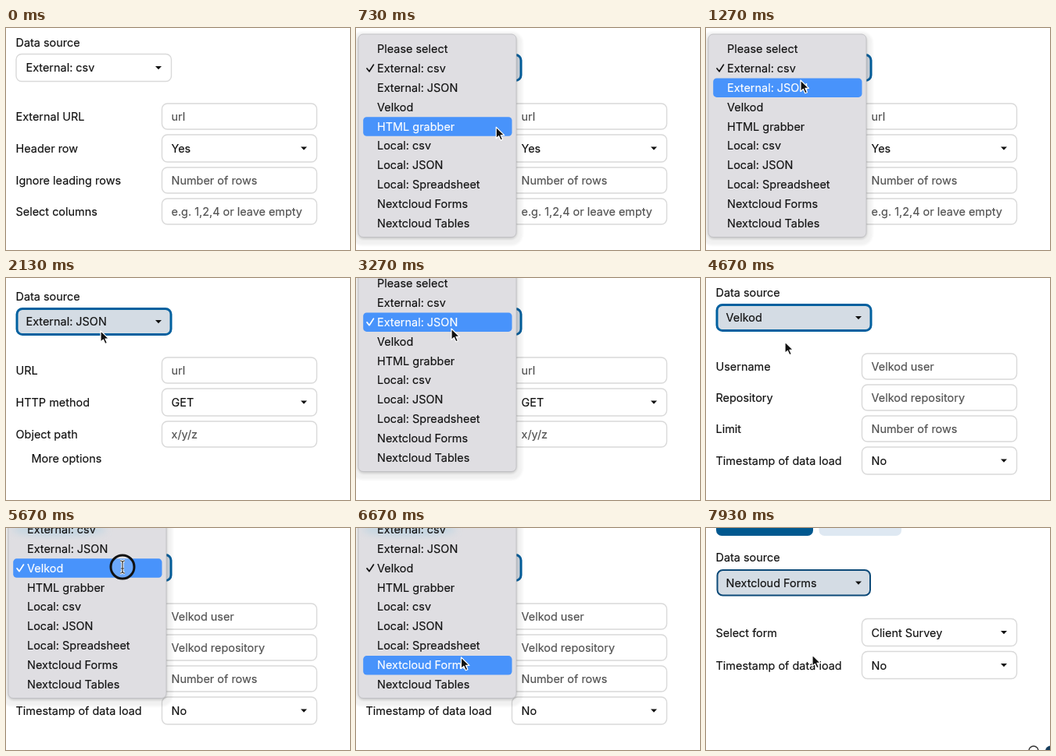
These frames come from a looping animation (440x285 px, 8000 ms). An HTML page:

```html
<!DOCTYPE html>
<html lang="en">
<head>
<meta charset="utf-8">
<title>Data source picker</title>
<style>
  html, body { margin: 0; width: 100%; height: 100%; overflow: hidden; background: #fff; }
  svg { display: block; width: 440px; height: 285px; }
  text { font: 14.45px Inter, "Open Sans", sans-serif; fill: #111; stroke: #111; stroke-width: 0.15; }
  .hint { fill: #505050; stroke: #505050; }
  .lit { fill: #fff; stroke: #fff; }
  .box { fill: #fff; stroke: #d9d9d9; stroke-width: 1.4; }
</style>
</head>
<body>
<svg id="stage" viewBox="0 0 440 285">
  <defs>
    <filter id="soft" x="-20%" y="-20%" width="140%" height="140%"><feGaussianBlur stdDeviation="5"/></filter>
    <filter id="crisp" x="-20%" y="-20%" width="140%" height="140%"><feGaussianBlur stdDeviation="1.5"/></filter>
  </defs>
</svg>
<script>
const LOOP = 8000;
const stage = document.getElementById('stage');

function add(parent, tag, attrs = {}, content) {
  const el = document.createElementNS('http://www.w3.org/2000/svg', tag);
  for (const key in attrs) el.setAttribute(key, attrs[key]);
  if (content) el.textContent = content;
  parent.append(el);
  return el;
}
const set = (el, attrs) => { for (const key in attrs) el.setAttribute(key, attrs[key]); };
const show = (el, on) => el.setAttribute('visibility', on ? 'visible' : 'hidden');
const clamp = v => Math.max(0, Math.min(1, v));
const smooth = v => v * v * (3 - 2 * v);
const label = (g, x, mid, s, cls = '') => add(g, 'text', { x, y: mid + 5.2, class: cls }, s);
const caret = (g, x, y) => add(g, 'path', { d: `M${x - 4} ${y - 2}h8l-4 4.2z`, fill: '#111' });

// Each row: label, content, isSelect
const forms = [
  { from: 0, top: 0, source: 'External: csv', rows: [
    ['External URL', 'url'], ['Header row', 'Yes', true],
    ['Ignore leading rows', 'Number of rows'], ['Select columns', 'e.g. 1,2,4 or leave empty']] },
  { from: 1870, top: 5, source: 'External: JSON', extra: 'More options', rows: [
    ['URL', 'url'], ['HTTP method', 'GET', true], ['Object path', 'x/y/z']] },
  { from: 4230, top: 0, source: 'Velkod', rows: [
    ['Username', 'Velkod user'], ['Repository', 'Velkod repository'],
    ['Limit', 'Number of rows'], ['Timestamp of data load', 'No', true]] },
  { from: 7270, top: 19.5, source: 'Nextcloud Forms', rows: [
    ['Select form', 'Client Survey', true], ['Timestamp of data load', 'No', true]] }
];

function buildForm({ top, source, rows, extra }) {
  const g = add(stage, 'g');
  label(g, 12.5, top + 18.5, 'Data source');
  const picker = add(g, 'rect', { x: 13, y: top + 33.5, width: 198.5, height: 35, rx: 7, class: 'box' });
  label(g, 25.5, top + 51, source);
  caret(g, 195, top + 51);
  let y = top + 97;
  for (const [name, value, isSelect] of rows) {
    const height = isSelect ? 35 : 33, mid = y + height / 2;
    label(g, 12.5, mid + 0.5, name);
    add(g, 'rect', { x: 199.5, y, width: 198, height, rx: 7, class: 'box' });
    label(g, 211.5, mid + 0.5, value, isSelect ? '' : 'hint');
    if (isSelect) caret(g, 381, mid);
    y += height + 7;
  }
  if (extra) label(g, 32.5, y + 8, extra);
  return { g, picker, top };
}
const views = forms.map(buildForm);

// Page parts that scroll into view with the shortest form
const buttons = add(stage, 'g');
add(buttons, 'rect', { x: 13, y: -24, width: 124, height: 34, rx: 7, fill: '#00588f' });
add(buttons, 'rect', { x: 144.5, y: -24, width: 105.5, height: 34, rx: 7, fill: '#dee8f2' });
const corner = add(stage, 'g');
add(corner, 'circle', { cx: 419, cy: 286, r: 6, fill: '#fff', stroke: '#333', 'stroke-width': 1.4 });
add(corner, 'circle', { cx: 441, cy: 286.5, r: 7, fill: '#173f5f' });

// Dropdown
const options = ['Please select', 'External: csv', 'External: JSON', 'Velkod', 'HTML grabber',
  'Local: csv', 'Local: JSON', 'Local: Spreadsheet', 'Nextcloud Forms', 'Nextcloud Tables'];
const ROW = 24.95, FIRST = 26.5;
const menu = add(stage, 'g');
add(menu, 'rect', { x: -6, y: 5, width: 219, height: 274, rx: 14, fill: '#000', opacity: 0.05, filter: 'url(#crisp)' });
add(menu, 'rect', { x: 2, y: 9, width: 204, height: 262, rx: 8, fill: '#000', opacity: 0.15, filter: 'url(#crisp)' });
add(menu, 'rect', { x: 3, y: 8, width: 202, height: 260.5, rx: 6, fill: '#dfdee2', stroke: '#bcbbbf', 'stroke-width': 0.8 });
const tint = add(menu, 'ellipse', { cx: 68, cy: 52, rx: 60, ry: 9, fill: '#b9d3e2', opacity: 0.7, filter: 'url(#soft)' });
const bar = add(menu, 'rect', { x: 9.2, width: 190.3, height: 24.5, rx: 4.5, fill: '#4893fb' });
const items = options.map((s, i) => label(menu, 27, FIRST + i * ROW, s));
const tick = add(menu, 'path', { d: 'M-4 0.5l3 3.8l5.5-8.6', fill: 'none', 'stroke-width': 1.7,
  'stroke-linecap': 'round', 'stroke-linejoin': 'round' });

const menus = [
  { open: 500, close: 1860, blink: 1790, shift: 0, checked: 1 },
  { open: 2930, close: 4200, blink: 4080, shift: -20, checked: 2 },
  { open: 5470, close: 7200, blink: 7120, shift: -50, checked: 3 }
];
const FADE = 150, BLINK = 75;

// Pointer
const ring = add(stage, 'circle', { fill: '#fff', 'fill-opacity': 0.2, stroke: '#111', 'stroke-width': 3 });
const arrow = add(stage, 'path', { d: 'M0 0V14.5L3.4 11.4L5.8 16.8L8.4 15.6L6 10.4H10.5Z',
  fill: '#111', stroke: '#fff', 'stroke-width': 1.2, 'stroke-linejoin': 'round' });
const beam = add(stage, 'g', { fill: 'none' });
for (const [stroke, width] of [['#fff', 3.2], ['#333', 1.2]])
  add(beam, 'path', { d: 'M-3-8Q0-8 0-5.5Q0-8 3-8M0-6V6M-3 8Q0 8 0 5.5Q0 8 3 8M-2 2H2', stroke, 'stroke-width': width });

const path = [
  [70, 296, 190], [430, 148, 46], [600, 148, 46], [890, 221, 236], [1230, 121, 67],
  [2660, 121, 68], [2730, 122, 65], [3300, 122, 65], [3900, 101, 82], [4670, 101, 82],
  [5000, 149, 50], [6330, 149, 50], [6640, 134.5, 166], [7200, 134.5, 166], [7400, 136, 163]
];
const presses = [[440, 640], [1560, 1790], [2930, 3150], [3940, 4080], [5470, 6000], [6880, 7120]];

function pointerAt(t) {
  const next = path.findIndex(p => p[0] > t);
  if (next < 0) return path.at(-1).slice(1);
  if (next === 0) return path[0].slice(1);
  const [t0, x0, y0] = path[next - 1], [t1, x1, y1] = path[next];
  const k = smooth((t - t0) / (t1 - t0));
  return [x0 + (x1 - x0) * k, y0 + (y1 - y0) * k];
}

function drawForm(t) {
  const current = forms.findLastIndex(f => t >= f.from);
  views.forEach((v, i) => show(v.g, i === current));
  const { picker, top } = views[current];
  const settled = t >= 7930;
  if (t < 500) set(picker, { x: 13, y: top + 33.5, width: 198.5, height: 35, style: '' });
  else if (settled) set(picker, { x: 14.5, y: top + 34.5, width: 195.5, height: 32.5,
    style: 'fill:#d4dce4;stroke:#0d4a78;stroke-width:2' });
  else set(picker, { x: 14, y: top + 34.5, width: 197, height: 33,
    style: 'fill:#d4dce4;stroke:#00609f;stroke-width:3' });
  show(buttons, current === 3);
  show(corner, settled);
}

function drawMenu(t, x, y) {
  const m = menus.find(m => t >= m.open && t < m.close + FADE);
  menu.setAttribute('display', m ? 'inline' : 'none');
  if (!m) return;
  set(menu, { transform: `translate(0 ${m.shift})`, opacity: 1 - clamp((t - m.close) / FADE) });
  tint.setAttribute('display', m.shift === -50 ? 'inline' : 'none');
  const blinking = t >= m.blink && t < m.blink + BLINK;
  const row = Math.round((y - m.shift - FIRST) / ROW);
  const hover = x > 3 && x < 205 && !blinking ? row : -1;
  bar.setAttribute('display', hover < 0 ? 'none' : 'inline');
  bar.setAttribute('y', FIRST + hover * ROW - 12);
  items.forEach((el, i) => el.classList.toggle('lit', i === hover));
  set(tick, { transform: `translate(18 ${FIRST + m.checked * ROW})`,
    stroke: hover === m.checked ? '#fff' : '#111' });
}

function drawPointer(t, x, y) {
  const press = presses.find(p => t >= p[0] && t < p[1]);
  const typing = press && press[0] === 5470;
  const at = `translate(${x} ${y})`;
  set(arrow, { transform: at });
  set(beam, { transform: at });
  show(arrow, t >= 70 && !typing);
  show(beam, typing);
  show(ring, press);
  if (press) set(ring, { cx: x, cy: y, r: 10 + 5 * smooth(clamp((t - press[0]) / 100)),
    opacity: clamp((press[1] - t) / 100) });
}

function draw(t) {
  const [x, y] = pointerAt(t);
  drawForm(t);
  drawMenu(t, x, y);
  drawPointer(t, x, y);
}

const start = performance.now();
function frame() {
  draw((performance.now() - start) % LOOP);
  requestAnimationFrame(frame);
}
draw(0);
requestAnimationFrame(frame);
</script>
</body>
</html>
```
